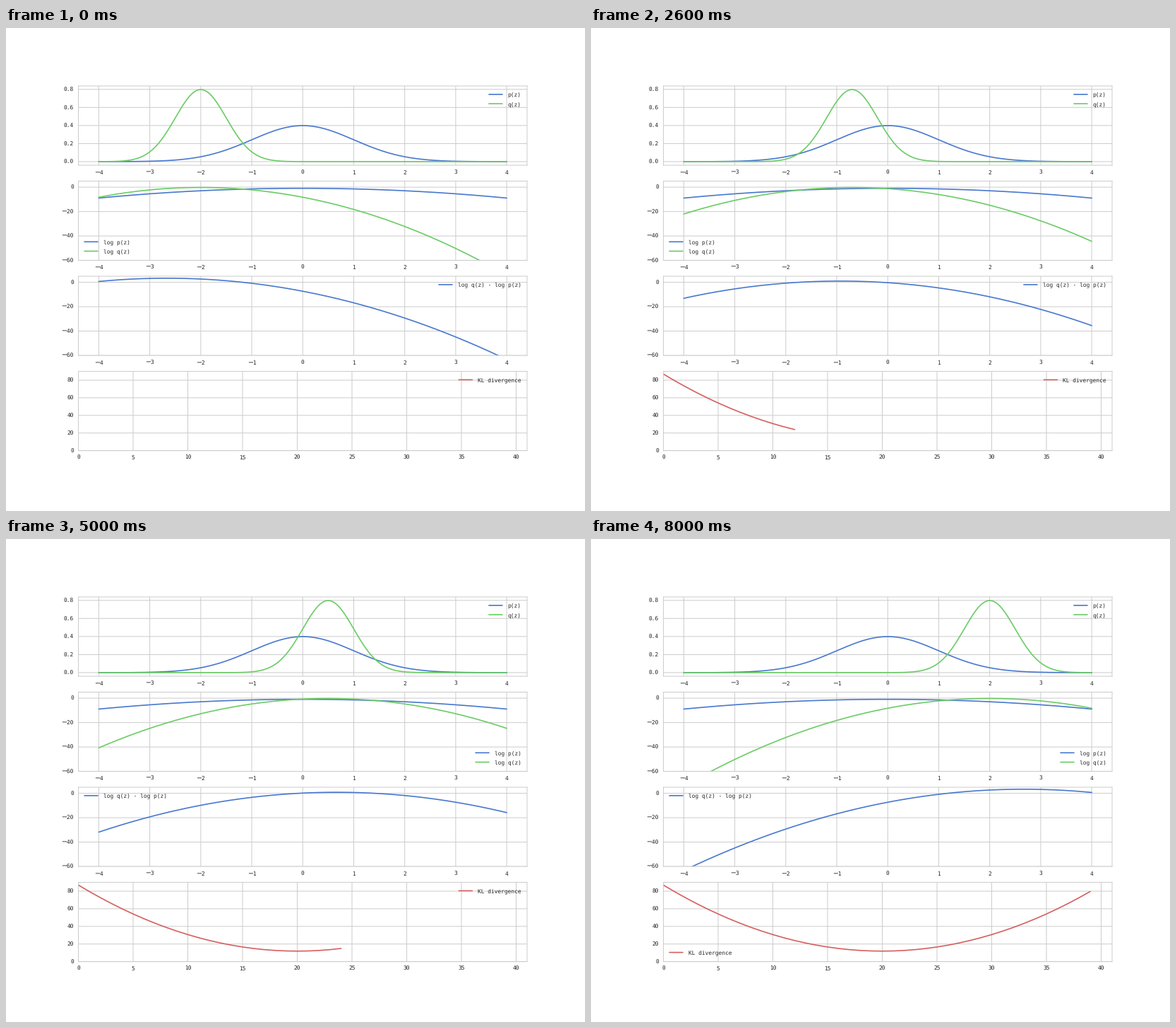
A matplotlib script that plays this animation: 820x683 px, repeating every 8200 ms.

```python
import numpy as np
import matplotlib.pyplot as plt
from matplotlib.animation import FuncAnimation
from matplotlib.ticker import FuncFormatter, MultipleLocator

W, H, DPI = 820, 683, 64
FRAMES, INTERVAL = 41, 200
BLUE, GREEN, RED = "#4878CF", "#6ACC65", "#D65F5F"
GRID, INK = "#cccccc", "#262626"


def px(n):
    """Pixels to points."""
    return n * 72 / DPI


EM = 9.49        # layout unit of the legends, in pixels
FONT = 7.93      # glyph size, in pixels
K = EM / FONT

plt.rcParams.update({
    "font.family": ["DejaVu Sans Mono", "Noto Sans CJK JP"],
    "font.size": px(FONT),
    "text.color": INK,
    "text.hinting": "none",
    "path.snap": False,
    "axes.edgecolor": GRID,
    "axes.linewidth": px(1),
    "axes.axisbelow": True,
    "axes.grid": True,
    "grid.color": GRID,
    "grid.linewidth": px(1),
    "lines.linewidth": px(1.66),
    "lines.solid_capstyle": "round",
    "xtick.labelsize": px(FONT),
    "ytick.labelsize": px(FONT),
    "xtick.labelcolor": INK,
    "ytick.labelcolor": INK,
    "xtick.major.size": 0,
    "ytick.major.size": 0,
    "xtick.major.pad": px(6.64),
    "ytick.major.pad": px(6.64),
    "legend.frameon": False,
    "legend.fontsize": px(FONT),
    "legend.borderaxespad": 0.5 * K,
    "legend.borderpad": 0.4 * K,
    "legend.handlelength": 2 * K,
    "legend.handletextpad": 0.8 * K,
    "legend.labelspacing": 0.68,
})


def log_normal(z, mu, sd):
    return -0.5 * ((z - mu) / sd) ** 2 - np.log(sd * np.sqrt(2 * np.pi))


def wide_minus(fmt):
    return FuncFormatter(lambda v, _: format(v, fmt).replace("-", "\uff0d"))


def setup(ax, xlim, ylim, xstep, ystep, yfmt=".0f"):
    ax.set(xlim=xlim, ylim=ylim)
    for axis, step, fmt in ((ax.xaxis, xstep, ".0f"), (ax.yaxis, ystep, yfmt)):
        axis.set_major_locator(MultipleLocator(step))
        axis.set_major_formatter(wide_minus(fmt))


z = np.linspace(-4, 4, 301)
mus = -2 + 0.1 * np.arange(FRAMES)
log_p = log_normal(z, 0, 1)
log_qs = [log_normal(z, mu, 0.5) for mu in mus]
kl = np.array([np.sum(np.exp(lq) * (lq - log_p)) for lq in log_qs])

fig, (dens, logs, diff, div) = plt.subplots(
    4, 1, figsize=(W / DPI, H / DPI), dpi=DPI, facecolor="white")
fig.subplots_adjust(left=0.125, right=0.9, bottom=0.125, top=0.88, hspace=0.2)

setup(dens, (-4.4, 4.4), (-0.0399, 0.8378), 1, 0.2, ".1f")
setup(logs, (-4.4, 4.4), (-60, 5), 1, 20)
setup(diff, (-4.4, 4.4), (-60, 5), 1, 20)
setup(div, (0, 41), (0, 90), 5, 20)

dens.plot(z, np.exp(log_p), color=BLUE, label="p(z)")
q_line, = dens.plot(z, np.exp(log_qs[0]), color=GREEN, label="q(z)")
logs.plot(z, log_p, color=BLUE, label="log p(z)")
lq_line, = logs.plot(z, log_qs[0], color=GREEN, label="log q(z)")
diff_line, = diff.plot(z, log_qs[0] - log_p, color=BLUE,
                       label="log q(z) - log p(z)")
kl_line, = div.plot([], [], color=RED, label="KL divergence")

# The legends move to whichever corner the curves leave free.
dens.legend(loc="upper right")
for ax in (logs, diff, div):
    ax.legend(loc="best")


def update(i):
    lq = log_qs[i]
    q_line.set_ydata(np.exp(lq))
    lq_line.set_ydata(lq)
    diff_line.set_ydata(lq - log_p)
    kl_line.set_data(np.arange(i), kl[:i])
    return q_line, lq_line, diff_line, kl_line


anim = FuncAnimation(fig, update, frames=FRAMES, interval=INTERVAL,
                     repeat=True, repeat_delay=0, blit=False)
plt.show()
```
